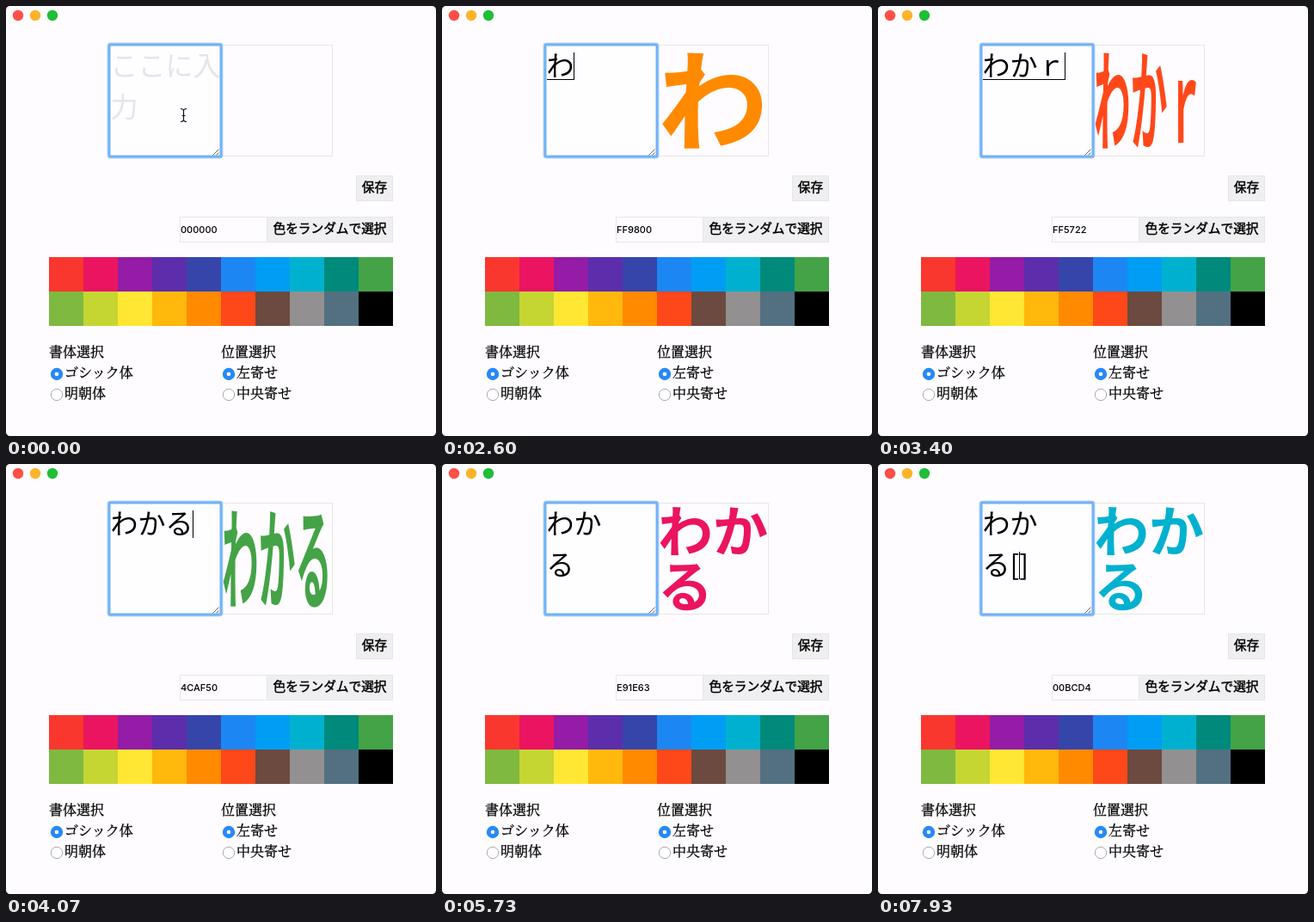
Animation, 500 px wide and 500 px high, one loop 8000 ms. Source, as an HTML page:

```html
<!DOCTYPE html>
<html lang="ja">
<head>
<meta charset="utf-8">
<style>
  html, body { margin: 0; width: 100%; height: 100%; overflow: hidden; background: #000; }
  svg { display: block; width: 100%; height: 100%; }
  text { font-family: "Noto Sans CJK JP", "Noto Sans CJK", sans-serif; white-space: pre; }
  .mincho { font: 500 16px "Noto Serif CJK JP", "Noto Sans CJK JP", "Noto Sans CJK", serif; stroke: #000; stroke-width: .3; }
  .button { font-size: 14.67px; font-weight: 500; text-anchor: middle; stroke: #000; stroke-width: .45; }
  .area { font-size: 32px; }
  .preview { font-size: 64px; font-weight: 700; text-anchor: middle; }
  #hex { font: 500 11px Inter, sans-serif; }
</style>
</head>
<body>
<svg viewBox="0 0 500 500">
  <g id="fixed"></g>
  <clipPath id="previewClip"><rect x="251" y="46" width="128" height="128"/></clipPath>
  <g id="preview" clip-path="url(#previewClip)"></g>
  <g id="area"></g>
  <path id="caret" stroke="#000"/>
  <text id="hex" x="203" y="264"></text>
  <path id="pointer" fill="none" stroke="#111" stroke-width="1.2"
    d="M203 119.5q3.5 0 3.5 2.5q0-2.5 3.5-2.5M203 134.5q3.5 0 3.5-2.5q0 2.5 3.5 2.5M206.5 122v10M204.5 127.5h4"/>
</svg>
<script>
const $ = id => document.getElementById(id);
const LOOP = 8000, BLINK = 500;

const palette = [
  ['F44336', '#f9372f'], ['E91E63', '#eb1460'], ['9C27B0', '#941ca6'], ['673AB7', '#5c2eac'],
  ['3F51B5', '#3645aa'], ['2196F3', '#1c87f3'], ['03A9F4', '#009df4'], ['00BCD4', '#00b1cf'],
  ['009688', '#008a7b'], ['4CAF50', '#44a346'], ['8BC34A', '#7fb93f'], ['CDDC39', '#c5d633'],
  ['FFEB3B', '#ffe734'], ['FFC107', '#ffb80b'], ['FF9800', '#ff8a00'], ['FF5722', '#ff481a'],
  ['795548', '#6c4a3f'], ['9E9E9E', '#929090'], ['607D8B', '#537081'], ['000000', '#000000']
];

// Typing steps; caret is [x offset, row], composing text is underlined.
const steps = [
  { at: -600, text: '', caret: [0, 0], color: 19 },
  { at: 2330, text: 'ｗ', caret: [32, 0], color: 5, composing: true },
  { at: 2530, text: 'わ', caret: [32, 0], color: 14, composing: true },
  { at: 2870, text: 'わｋ', caret: [64, 0], color: 2, composing: true },
  { at: 3070, text: 'わか', caret: [64, 0], color: 18, composing: true },
  { at: 3400, text: 'わかｒ', caret: [96, 0], color: 15, composing: true },
  { at: 3600, text: 'わかる', caret: [96, 0], color: 9, composing: true },
  { at: 3870, text: 'わかる', caret: [96, 0], color: 9 },
  { at: 4470, text: 'わかる', caret: [64, 0], color: 9 },
  { at: 4930, text: 'わか\nる', caret: [0, 1], color: 1 },
  { at: 5200, text: 'わか\nる', caret: [32, 1], color: 1 },
  { at: 6870, text: 'わか\nる[', caret: [44, 1], color: 3 },
  { at: 7400, text: 'わか\nる', caret: [32, 1], color: 7 },
  { at: 7800, text: 'わか\nる[]', shown: 'わか\nる', caret: [43, 1], color: 7 }
];

const rect = (x, y, w, h, fill, extra = '') =>
  `<rect x="${x}" y="${y}" width="${w}" height="${h}" fill="${fill}" ${extra}/>`;
const circle = (x, y, r, fill, extra = '') =>
  `<circle cx="${x}" cy="${y}" r="${r}" fill="${fill}" ${extra}/>`;
const label = (x, y, str, cls, extra = '') =>
  `<text x="${x}" y="${y}" class="${cls}" ${extra}>${str}</text>`;
const areaLines = (lines, fill) =>
  lines.map((line, row) => label(121.5, 81 + row * 48, line, 'area', `fill="${fill}"`)).join('');

function button(x, y, w, str) {
  return rect(x + .5, y + .5, w - 1, 29, '#efeef0', 'stroke="#e6e5e8"') +
    label(x + w / 2, y + 19, str, 'button');
}

function radioGroup(x, title, options) {
  return label(x, 407.5, title, 'mincho') + options.map((name, i) => {
    const y = 428 + i * 24;
    const mark = i
      ? circle(x + 9, y, 6.7, '#fff', 'stroke="#aaa9ac"')
      : circle(x + 9, y, 7.2, '#2789f5') + circle(x + 9, y, 2.3, '#fff');
    return mark + label(x + 18, y + 3.5, name, 'mincho');
  }).join('');
}

function drawFixed() {
  const lights = ['#ff4f47', '#fdb32a', '#1fbe37'];
  const ring = (color, width) =>
    rect(120, 45, 130, 130, '#fefdff', `rx="1.5" stroke="${color}" stroke-width="${width}"`);
  $('fixed').innerHTML =
    rect(0, 0, 500, 500, '#fefcff', 'rx="4.5"') +
    lights.map((c, i) => circle(14 + i * 20, 11, 6.2, c)).join('') +
    rect(251.5, 45.5, 128, 129, '#fefcff', 'stroke="#e8e6e9"') +
    ring('#b5d7fa', 5) + ring('#72b2f5', 3) +
    '<path d="M240.5 173.5l7-7M244.5 173.5l3-3" stroke="#666"/>' +
    button(407, 197, 43, '保存') +
    rect(202.5, 245.5, 101, 29, '#fefcff', 'stroke="#e8e6e9"') +
    button(303, 245, 147, '色をランダムで選択') +
    palette.map(([, c], i) => rect(50 + i % 10 * 40, 292 + Math.floor(i / 10) * 40, 40, 40, c)).join('') +
    radioGroup(50, '書体選択', ['ゴシック体', '明朝体']) +
    radioGroup(250, '位置選択', ['左寄せ', '中央寄せ']);
}

// Each character fills one cell of a grid that spans the square preview.
function previewMarkup(text, fill) {
  const lines = text.split('\n');
  const w = 128 / Math.max(...lines.map(line => line.length));
  const h = 128 / lines.length;
  return lines.map((line, row) => [...line].map((char, col) => {
    const x = 251 + (col + .5) * w, y = 46 + (row + .88) * h;
    return label(0, 0, char, 'preview',
      `fill="${fill}" transform="translate(${x} ${y}) scale(${w / 64} ${h / 64})"`);
  }).join('')).join('');
}

function showStep({ text, shown = text, caret: [x, row], color, composing }) {
  const [code, fill] = palette[color];
  $('hex').textContent = code;
  $('preview').innerHTML = previewMarkup(shown, fill);
  $('area').innerHTML = text
    ? areaLines(text.split('\n'), '#000') + (composing ? rect(122, 85, x - 1, 1, '#000') : '')
    : areaLines(['ここに入', '力'], '#e6e4e7');
  $('caret').setAttribute('d', `M${121.5 + x} ${54 + row * 48}v32`);
  $('pointer').style.display = text ? 'none' : '';
}

const start = performance.now();
let current;

function frame() {
  const t = (performance.now() - start) % LOOP;
  const step = steps.findLast(s => s.at <= t);
  if (step !== current) showStep(current = step);
  const caretOn = (t - step.at) % (2 * BLINK) < BLINK;
  $('caret').style.display = caretOn ? '' : 'none';
  requestAnimationFrame(frame);
}

drawFixed();
frame();
</script>
</body>
</html>
```
